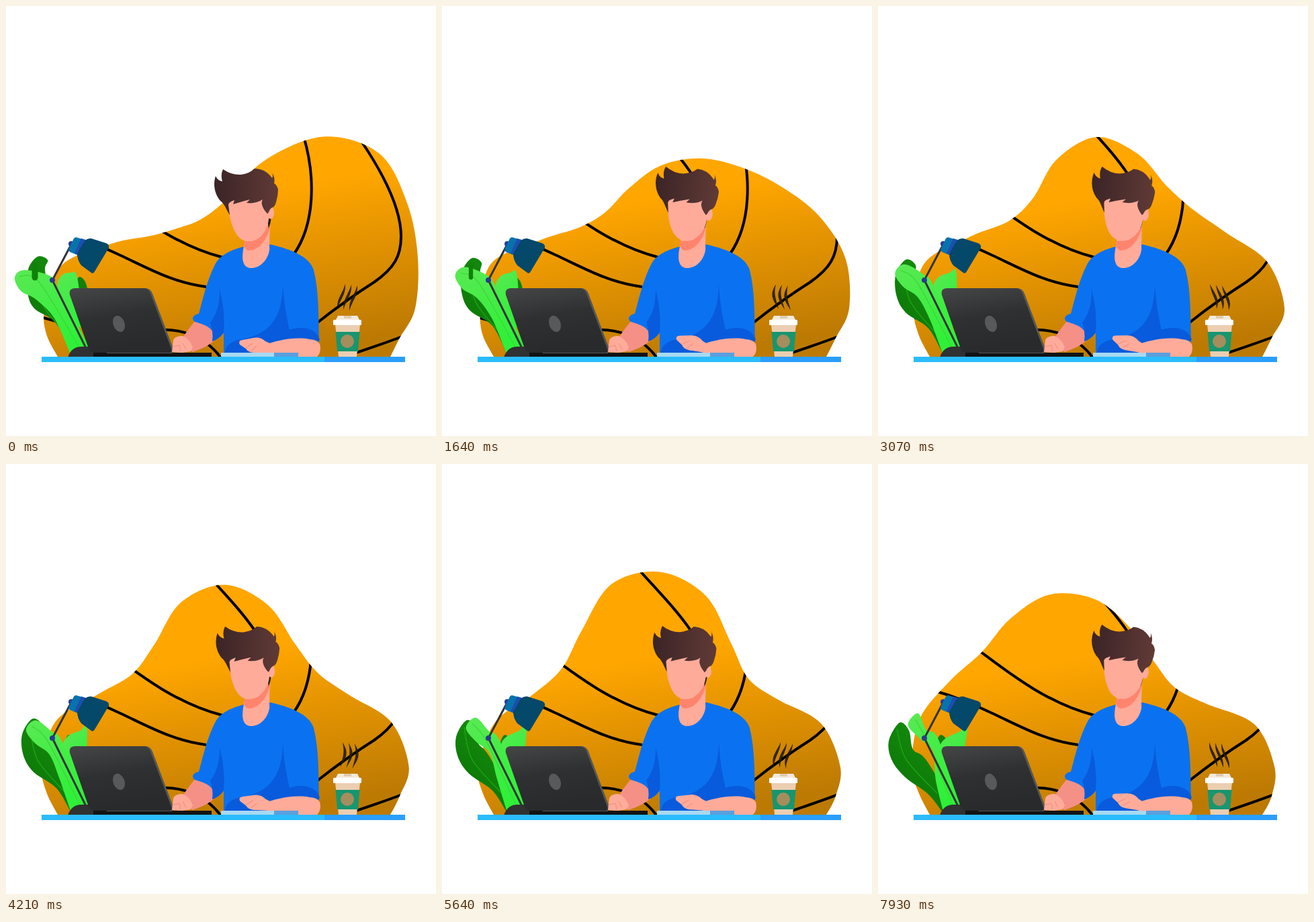
Animation, 640 px wide and 640 px high, one loop 8000 ms. Source, as an HTML page:

```html
<!DOCTYPE html>
<html lang="en">
<head>
<meta charset="utf-8">
<title>Desk scene</title>
<style>
  html, body { margin: 0; width: 100%; height: 100%; overflow: hidden; background: #fff; }
  svg { display: block; width: 100%; height: 100%; }
  .line { fill: none; stroke: #000; stroke-width: 4; }
  .skin { fill: #ffab9a; }
  .fold { fill: #085bdc; }
</style>
</head>
<body>
<svg viewBox="0 0 640 640">
  <defs>
    <linearGradient id="amber" gradientUnits="userSpaceOnUse" x1="305" y1="288" x2="347" y2="525">
      <stop offset="0" stop-color="#ffa600"/><stop offset="1" stop-color="#bd7a03"/>
    </linearGradient>
    <linearGradient id="hairFill"><stop offset="0" stop-color="#3b2426"/><stop offset="1" stop-color="#603a36"/></linearGradient>
    <linearGradient id="screen" x2=".25" y2="1"><stop offset="0" stop-color="#454646"/><stop offset=".5" stop-color="#2f3031"/><stop offset="1" stop-color="#292a2b"/></linearGradient>
    <linearGradient id="bright" x2=".4" y2="1"><stop offset="0" stop-color="#5ae954"/><stop offset="1" stop-color="#2ff038"/></linearGradient>
    <linearGradient id="dark" x1="0" y1="1" x2=".6" y2="0"><stop offset="0" stop-color="#0a7005"/><stop offset="1" stop-color="#148c0d"/></linearGradient>
    <clipPath id="blobClip"><path id="clipShape"/></clipPath>
  </defs>

  <path id="blob" fill="url(#amber)"/>
  <g class="line" clip-path="url(#blobClip)">
    <path d="M443 194C461 255 460 325 428 370"/>
    <path d="M528 200C566 256 588 306 588 343C588 372 578 390 548 411C515 432 490 450 460 474"/>
    <path d="M148 276C190 307 250 356 322 374"/>
    <path d="M82 337C115 346 140 357 170 371C215 392 250 412 298 418"/>
    <path d="M290 154C325 193 350 218 371 249"/>
    <path d="M225 483C262 478 300 495 320 524"/>
    <path d="M515 518Q555 505 598 489"/>
    <path d="M48 462L92 474"/>
  </g>

  <!-- man -->
  <path fill="#f59086" d="M283 467Q270 482 263 494L277 515Q297 509 309 499L314 478Z"/>
  <path fill="#0a72f0" d="M358 357C334 363 320 370 312 383C299 408 293 436 287 458C277 460 276 467 281 470C292 473 303 477 307 484Q309 493 307 499Q317 496 324 486L324 518L420 518L466 500C465 462 466 425 458 393C452 374 428 363 394 355Z"/>
  <path class="fold" d="M318 422C318 445 313 460 304 471Q309 484 307 499Q317 496 324 486C326 462 323 442 318 422Z"/>
  <path class="fold" d="M412 415C414 445 418 465 422 482C441 475 463 480 467 497L440 518L325 518C327 505 334 499 350 496C388 489 411 470 412 415Z"/>
  <path class="skin" d="M357 340L353 363C350 382 355 391 367 390C382 389 394 371 392 357L393 315Z"/>
  <path fill="#ff846e" d="M355 350Q378 349 392 322L392 333Q382 363 361 364Q352 361 355 350Z"/>
  <path fill="#281819" d="M388 312L395 314Q394 323 391 331Z"/>
  <g id="head">
    <path class="skin" d="M331 288C331 310 335 325 341 336C348 350 361 354 374 347C385 340 390 328 391 317L398 302L385 280L340 282Z"/>
    <ellipse class="skin" cx="394" cy="308" rx="5" ry="9"/>
    <path fill="url(#hairFill)" d="M333 311C328 303 325 294 319 290C310 279 308 265 312 253Q315 260 322 261Q319 251 323 243Q336 252 350 251Q363 249 370 242Q386 242 396 256Q398 253 396 248Q401 256 399 264Q403 266 405 273Q405 282 402 292Q400 299 396 300C391 303 392 308 389 309Q383 303 381 296Q380 291 382 288Q371 295 358 293L363 288Q351 291 338 295L340 289Q331 292 331 296Z"/>
  </g>
  <path class="skin" d="M382 506C402 497 432 492 452 496Q464 497 467 503Q470 515 463 522H412Q394 520 382 512Z"/>
  <path fill="#a7d9f2" d="M320 516H400V522H320Z"/>
  <path fill="#5a9fdd" d="M399 516H435V522H399Z"/>
  <g id="fist">
    <path class="skin" d="M348 504Q345 498 352 497L368 494Q378 492 386 499L402 506L397 516L374 516Q361 517 357 510Z"/>
    <path fill="none" stroke="#f08c7c" d="M357 509L367 502M365 513L373 506"/>
  </g>

  <!-- plant -->
  <path id="backLeaf" fill="#157f0d" d="M100 430Q104 403 110 403Q122 406 123 440Z"/>
  <path id="sideLeaf" fill="url(#bright)"/>
  <path id="darkLeaf" fill="url(#dark)"/>
  <path id="darkVein" fill="none" stroke="#1ca314" stroke-width="1.5"/>
  <path id="leaf" fill="url(#bright)"/>
  <path id="vein" fill="none" stroke="#3dd838" stroke-width="1.3"/>
  <path id="tongue" stroke="#118009" stroke-linecap="round" d="M43 386V404"/>

  <!-- lamp -->
  <path fill="none" stroke="#333439" stroke-width="3" d="M97 355L69 408L122 515"/>
  <circle cx="97" cy="354" r="4" fill="#2a3b98"/>
  <circle cx="69" cy="408" r="4" fill="#2a3b8e"/>
  <path fill="#0773ac" d="M101 346Q103 343 107 345L121 349L107 371L95 366Q92 363 95 358Z"/>
  <path fill="#1e4db0" d="M112 346L122 349L108 371L102 368Z"/>
  <path fill="#04486a" d="M127 346Q119 345 115 353L106 369Q106 378 112 386L127 397Q130 399 132 395L153 360Q154 355 149 353Z"/>
  <path fill="#303132" d="M92 523Q97 507 112 507H140V523Z"/>

  <!-- laptop -->
  <path fill="#121315" d="M130 516H306V522H130Z"/>
  <path fill="#555657" d="M103 420H209Q215 421 218 428L249 510Q251 516 246 517H150Z"/>
  <path fill="url(#screen)" d="M95 430Q93 420 103 420H206Q212 421 215 428L246 510Q248 516 243 516H132Q126 516 123 510Z"/>
  <ellipse cx="168" cy="473" rx="8.5" ry="12.5" fill="#58595a" transform="rotate(-20 168 473)"/>
  <path class="skin" d="M247 515L249 497Q254 490 263 491Q274 496 278 508L275 514L262 516Z"/>
  <path fill="none" stroke="#f08c7c" d="M249 507L258 505L260 514M263 502L268 511"/>

  <path fill="#2abcfd" d="M53 522H475V530H53Z"/>
  <path fill="#2a9efc" d="M474 522H594V530H474Z"/>

  <!-- cup -->
  <path fill="#ecceb2" d="M490 474H527L522 522H495Z"/>
  <path fill="#17966f" d="M490.500 485H526.500L524 514H493Z"/>
  <circle cx="508" cy="499" r="10" fill="#a58d5d"/>
  <path fill="#f4eadd" d="M494 461H523L527 469H490Z"/>
  <path fill="#dfcbb0" d="M503 461H514V465H503Z"/>
  <rect x="487" y="467" width="42" height="8" rx="1.500" fill="#fff"/>
  <path id="steam" fill="#231a05" opacity=".9"/>
</svg>

<script>
const LOOP = 8000;
const CENTER = { x: 325, y: 450 };
const el = id => document.getElementById(id);
const lerp = (a, b, mix) => a + (b - a) * mix;

// Blob radii over a half turn from left to right, in equal steps.
const blobPoses = [
  { time: 0, radii: [267, 250, 193, 153, 138, 137, 159, 227, 295, 326, 314, 298, 284] },
  { time: 1600, radii: [267, 260, 204, 170, 164, 183, 211, 231, 243, 257, 275, 286, 281] },
  { time: 3070, radii: [271, 264, 215, 184, 189, 229, 255, 238, 210, 206, 224, 264, 280] },
  { time: 6000, radii: [271, 253, 217, 210, 240, 288, 294, 266, 211, 182, 197, 245, 266] },
  { time: 8000, radii: [275, 273, 254, 242, 255, 264, 246, 207, 175, 165, 187, 243, 265] }
];

const parsePoints = text => text.split(" ").map(pair => pair.split(",").map(Number));
const sway = (id, from, to) => ({ node: el(id), from: parsePoints(from), to: parsePoints(to) });

// Each leaf drifts evenly from its first outline to its last.
const leaves = [
  sway("darkLeaf",
    "97,518 75,472 42,450 32,425 33,392 47,373 62,378 58,392 66,420 105,505",
    "97,520 75,492 40,466 20,440 16,412 32,385 46,397 52,425 72,441 112,508"),
  sway("leaf",
    "95,516 72,465 45,437 22,424 13,404 27,393 64,401 78,420 125,510",
    "97,517 86,470 82,428 62,408 45,388 60,371 72,396 90,410 125,510"),
  sway("sideLeaf", "90,470 77,420 82,402 95,397 106,404 115,480", "95,470 92,425 100,409 122,398 134,389 118,480"),
  sway("vein", "20,402 50,412 110,510", "56,380 74,415 112,510"),
  sway("darkVein", "45,385 52,440 90,490", "28,395 42,440 88,490")
];

// Open Catmull-Rom curve through the points.
function smoothPath(points) {
  const at = i => points[Math.max(0, Math.min(points.length - 1, i))];
  let d = "M" + points[0];
  for (let i = 0; i < points.length - 1; i++) {
    const c1 = at(i).map((v, k) => v + (at(i + 1)[k] - at(i - 1)[k]) / 6);
    const c2 = at(i + 1).map((v, k) => v - (at(i + 2)[k] - at(i)[k]) / 6);
    d += "C" + [c1, c2, at(i + 1)].join(" ");
  }
  return d;
}

function blobPath(t) {
  const next = blobPoses.findIndex(pose => pose.time > t);
  const a = blobPoses[next - 1], b = blobPoses[next];
  const mix = (t - a.time) / (b.time - a.time);
  const arc = a.radii.map((radius, i) => {
    const r = lerp(radius, b.radii[i], mix);
    const angle = Math.PI * i / (a.radii.length - 1);
    return [CENTER.x - r * Math.cos(angle), CENTER.y - r * Math.sin(angle)];
  });
  return smoothPath([[77, 522], [60, 488], ...arc, [586, 494], [572, 522]]);
}

function wisp(x, top, height, phase) {
  const left = [], right = [];
  for (let i = 0; i <= 12; i++) {
    const s = i / 12;
    const cx = x + 5.5 * Math.sin(phase + s * Math.PI);
    const half = 2.2 * Math.sin(Math.PI * s);
    left.push([cx - half, top + s * height]);
    right.unshift([cx + half, top + s * height]);
  }
  return "M" + left.concat(right).join("L") + "Z";
}

function draw(t) {
  const outline = blobPath(t);
  el("blob").setAttribute("d", outline);
  el("clipShape").setAttribute("d", outline);

  for (const { node, from, to } of leaves) {
    const points = from.map((p, i) => p.map((v, k) => lerp(v, to[i][k], t / LOOP)));
    node.setAttribute("d", smoothPath(points));
  }
  el("backLeaf").setAttribute("transform", `translate(${-Math.min(16, Math.max(0, t - 1500) / 120)})`);
  el("tongue").setAttribute("stroke-width", 9 * Math.max(0, 1 - (t / 3000) ** 2));

  const nod = ((1 - Math.cos(2 * Math.PI * t / 4800)) / 2) ** 0.7;
  el("head").setAttribute("transform", `rotate(${6.4 * nod} 370 350)`);
  el("fist").setAttribute("transform", `rotate(${11 * nod} 392 508)`);

  const phase = Math.PI / 2 + t * 0.00119;
  el("steam").setAttribute("d",
    [0, 1, 2].map(i => wisp(499 + 9 * i, 414 + i, 37, phase)).join(""));
}

const start = performance.now();
function tick() {
  draw((performance.now() - start) % LOOP);
  requestAnimationFrame(tick);
}
tick();
</script>
</body>
</html>
```
